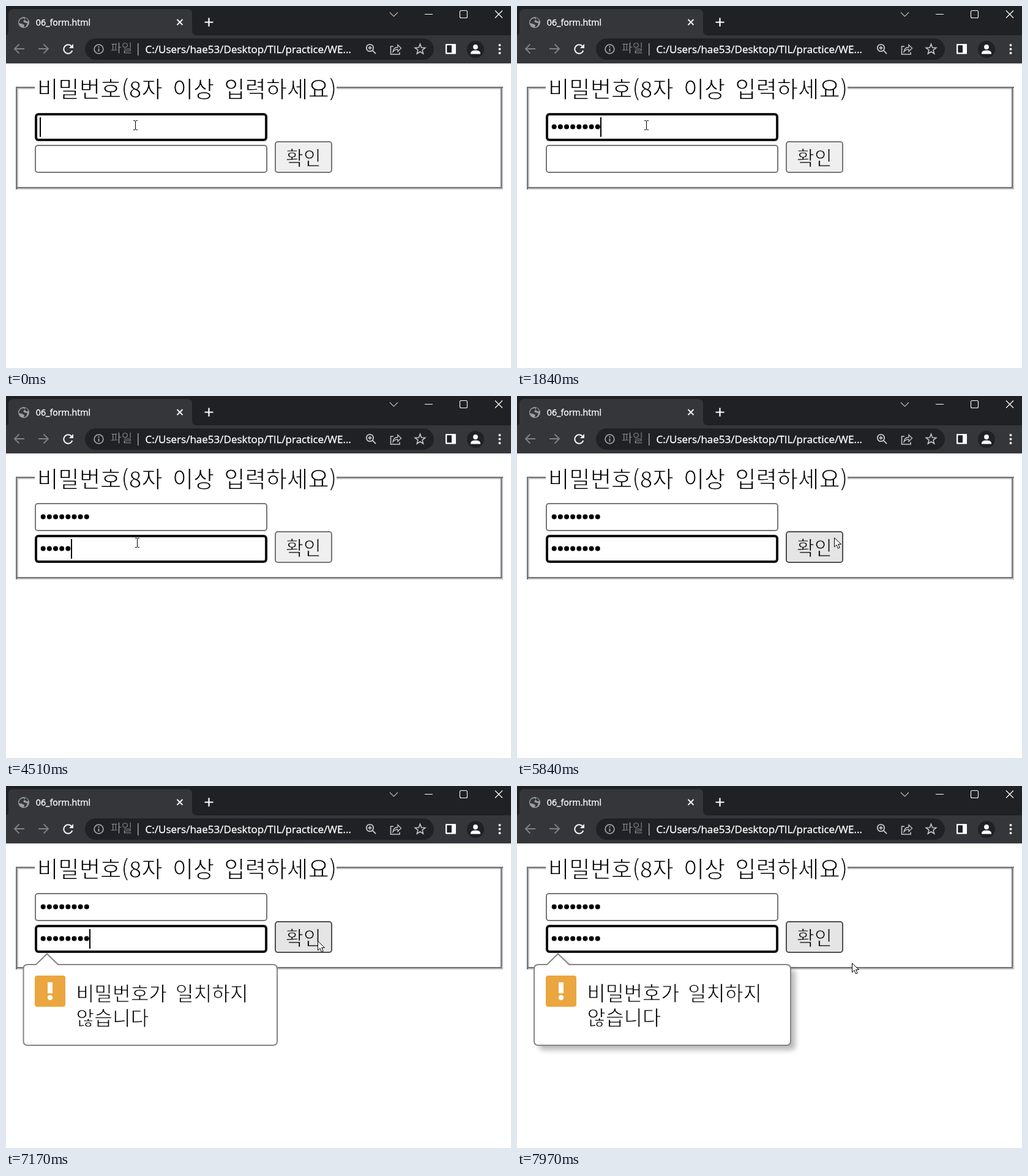
Write an HTML page with a canvas that moves like this. It is 825x592 px and loops after 8 s.

```html
<!DOCTYPE html>
<html lang="ko">
<head>
<meta charset="utf-8">
<style>
html, body { margin: 0; width: 100%; height: 100%; overflow: hidden; background: #fff; }
canvas { display: block; }
</style>
</head>
<body>
<canvas id="stage" width="825" height="592"></canvas>
<script>
const ctx = document.getElementById('stage').getContext('2d');
const LOOP = 8000;
const HANGUL = '"Noto Sans CJK KR", "Noto Sans CJK", sans-serif';
const LATIN = '"Open Sans", "Noto Sans", sans-serif';
const BAR = '#202124', TOOLBAR = '#35363a', GREY = '#9aa0a6', LIGHT = '#f1f3f4';

// Each track is a list of [start, value]; the latest started value holds.
const firstTyped = [[0, 0], [260, 1], [520, 2], [790, 3], [1050, 4], [1310, 6], [1590, 7], [1840, 8]];
const secondTyped = [[0, 0], [3440, 1], [3720, 2], [3970, 3], [4250, 4], [4510, 5], [4780, 6], [5040, 7], [5290, 8]];
const focus = [[0, 1], [2910, 2], [6910, 0], [7170, 2]];
const caretOn = [[0, true], [2370, false], [2910, true], [5840, false], [6370, true], [7700, false]];
const button = [[0, 'idle'], [5840, 'hover'], [6910, 'down'], [7170, 'hover']];
const pointer = [
  [0, ['beam', 211, 195]], [2110, ['beam', 212, 207]], [2370, ['arrow', 206, 225]],
  [2640, ['beam', 214, 240]], [5290, ['arrow', 285, 279]], [5570, ['beam', 421, 266]],
  [5840, ['arrow', 518, 231]], [6110, ['arrow', 515, 243]], [6370, ['arrow', 512, 253]],
  [6640, ['arrow', 509, 253]], [7970, ['arrow', 547, 289]]
];
const bubble = [
  [0, null],
  [7170, { left: 28.5, right: 443, size: 32.3, shadow: false }],
  [7440, { left: 28.5, right: 443, size: 32.3, shadow: true }],
  [7700, { left: 28, right: 447, size: 32.8, shadow: true }]
];
const buttonLook = {
  idle: ['#efefef', '#767676'],
  hover: ['#e5e5e5', '#4f4f4f'],
  down: ['#f5f5f5', '#8d8d8d']
};

function at(track, t) {
  let value;
  for (const [start, v] of track) if (t >= start) value = v;
  return value;
}

function rect(x, y, w, h, color) {
  ctx.fillStyle = color;
  ctx.fillRect(x, y, w, h);
}

function round(x, y, w, h, r, color) {
  ctx.beginPath();
  ctx.roundRect(x, y, w, h, r);
  ctx.fillStyle = color;
  ctx.fill();
}

function framed(x, y, w, h, r, border, fill, line = 2) {
  round(x, y, w, h, r, border);
  round(x + line, y + line, w - 2 * line, h - 2 * line, Math.max(r - line, 1), fill);
}

function dot(x, y, r, color) {
  ctx.beginPath();
  ctx.arc(x, y, r, 0, Math.PI * 2);
  ctx.fillStyle = color;
  ctx.fill();
}

function ring(x, y, r, color, line, from = 0, to = Math.PI * 2) {
  ctx.beginPath();
  ctx.arc(x, y, r, from, to);
  ctx.strokeStyle = color;
  ctx.lineWidth = line;
  ctx.stroke();
}

function stroke(path, color, line) {
  ctx.strokeStyle = color;
  ctx.lineWidth = line;
  ctx.stroke(new Path2D(path));
}

function fill(path, color) {
  ctx.fillStyle = color;
  ctx.fill(new Path2D(path));
}

function text(str, x, y, font, color, edge, line) {
  ctx.font = font;
  ctx.fillStyle = color;
  ctx.fillText(str, x, y);
  ctx.strokeStyle = edge;
  ctx.lineWidth = line;
  ctx.lineJoin = 'round';
  ctx.strokeText(str, x, y);
  ctx.lineJoin = 'miter';
}

// An edge in the background colour thins the strokes to a light weight.
function hangul(str, x, y, size, color, background) {
  ctx.wordSpacing = size * 0.2 + 'px';
  text(str, x, y, `300 ${size}px ${HANGUL}`, color, background, size * 0.026);
  ctx.wordSpacing = '0px';
}

function latin(str, x, y, size) {
  text(str, x, y, `${size}px ${LATIN}`, '#fff', '#fff', 0.35);
}

function drawTabs() {
  rect(0, 0, 825, 48, BAR);
  fill('M0 48Q4 48 4 40V13Q4 5 12 5H296Q304 5 304 13V40Q304 48 312 48Z', TOOLBAR);
  dot(29, 27, 9, GREY);
  fill('M22 24Q24 20 29 20L31 22L28 25L30 27L35 28L33 33L29 35L30 31L26 29L21 28Z', TOOLBAR);
  fill('M31 19Q36 21 36 25L33 25L31 23Z', TOOLBAR);
  latin('06_form.html', 48.8, 32, 14.2);
  stroke('M279.5 22L288.5 31M288.5 22L279.5 31', LIGHT, 2);
  stroke('M324.5 26.5H338.5M331.5 19.5V33.5', '#fff', 2.2);
  stroke('M627 10.5L633.5 17L640 10.5', '#bbb', 1.1);
  stroke('M684 13.5H697', '#fff', 1);
  ctx.beginPath();
  ctx.roundRect(741.5, 7.5, 12, 12, 2);
  ctx.strokeStyle = '#fff';
  ctx.lineWidth = 1.1;
  ctx.stroke();
  stroke('M799 7.5L811 19.5M811 7.5L799 19.5', '#fff', 1.2);
}

function drawToolbar() {
  rect(0, 48, 825, 45, TOOLBAR);
  rect(0, 93, 825, 1, '#494a4d');
  stroke('M30 70H14.5M21.5 62.5L14 70L21.5 77.5M53 70H68.5M61.5 62.5L69 70L61.5 77.5', '#808185', 1.9);
  ring(101.5, 70.5, 7.2, LIGHT, 2.1, 0.35, 5.5);
  fill('M110 62V69H103Z', LIGHT);

  round(129, 53, 570, 35, 17.5, BAR);
  ring(151.5, 70.5, 7.4, GREY, 1.8);
  rect(150.5, 69.5, 2, 5, GREY);
  rect(150.5, 66, 2, 2, GREY);
  hangul('파일', 171, 76, 19.2, GREY, BAR);
  rect(215, 61, 1.5, 20, GREY);
  latin('C:/Users/hae53/Desktop/TIL/practice/WE...', 227.6, 77, 17);

  const icon = '#c4c7ca';
  ring(594.5, 68.5, 5.7, icon, 1.8);
  stroke('M598.7 72.7L604 78M591.5 68.5H597.5M594.5 65.5V71.5', icon, 1.8);
  stroke('M633 66H628.5V79H643V75.5', icon, 1.6);
  stroke('M632 75Q633 67.5 640 67.5V63.5L645.5 69L640 74.5V70.8Q635 70.8 632 75Z', icon, 1.3);
  drawStar(676.5, 71, 8.7, icon);

  framed(718, 62, 17, 16.5, 1, '#fff', BAR, 2.3);
  rect(728, 63, 6, 14, '#fff');
  dot(767, 71, 14, BAR);
  dot(767, 67, 3.9, '#fff');
  fill('M759 78.5V76.5Q760 72.5 767 72.5Q774 72.5 775 76.5V78.5Z', '#fff');
  for (const y of [64, 70.5, 77]) dot(806.5, y, 2, LIGHT);
}

function drawStar(x, y, size, color) {
  ctx.beginPath();
  for (let i = 0; i < 10; i++) {
    const r = i % 2 ? size * 0.43 : size;
    const a = i * Math.PI / 5 - Math.PI / 2;
    ctx.lineTo(x + r * Math.cos(a), y + r * Math.sin(a));
  }
  ctx.closePath();
  ctx.strokeStyle = color;
  ctx.lineWidth = 1.6;
  ctx.stroke();
}

function drawFieldset() {
  const dark = '#727272', pale = '#c0c0c0';
  rect(16, 132, 796, 168, pale);
  rect(16, 132, 796, 2, dark);
  rect(16, 132, 2, 168, dark);
  rect(18, 296, 792, 2, dark);
  rect(808, 134, 2, 164, dark);
  rect(20, 136, 788, 160, '#fff');
  rect(18, 298, 794, 2, pale);
  rect(47, 131, 493, 6, '#fff');
  hangul('비밀번호(8자 이상 입력하세요)', 51, 150, 37.3, '#000', '#fff');
}

function drawInput(y, count, focused, hovered, caret) {
  if (focused) framed(47, y, 380, 46, 6, '#101010', '#fff', 4);
  else framed(47, y, 380, 46, 5, hovered ? '#4f4f4f' : '#767676', '#fff');
  for (let i = 0; i < count; i++) dot(60.7 + i * 10.15, y + 22.5, 4, '#000');
  if (focused && caret) rect(55 + Math.round(count * 10.15), y + 7, 2, 32, '#000');
}

function drawButton(state) {
  const [face, border] = buttonLook[state];
  framed(439, 221, 94, 52, 5, border, face);
  hangul('확인', 457, 260, 31.4, '#000', face);
}

function drawBubble({ left, right, size, shadow }) {
  const outline = new Path2D(
    `M${left + 7} 292H49L67 274.5L85 292H${right - 7}Q${right} 292 ${right} 299V417` +
    `Q${right} 424 ${right - 7} 424H${left + 7}Q${left} 424 ${left} 417V299Q${left} 292 ${left + 7} 292Z`);
  ctx.save();
  if (shadow) {
    ctx.shadowColor = 'rgba(0,0,0,.27)';
    ctx.shadowOffsetX = ctx.shadowOffsetY = 8;
    ctx.shadowBlur = 8;
  }
  ctx.fillStyle = '#fff';
  ctx.fill(outline);
  ctx.restore();
  ctx.strokeStyle = '#858585';
  ctx.lineWidth = 2;
  ctx.stroke(outline);

  round(47, 310, 50, 51, 4, '#eba63f');
  rect(68, 321, 8, 18, '#fff');
  dot(72, 346, 4.2, '#fff');
  hangul('비밀번호가 일치하지', 114.5, 351, size, '#000', '#fff');
  hangul('않습니다', 114.5, 391, size, '#000', '#fff');
}

function drawPointer([kind, x, y]) {
  ctx.save();
  ctx.translate(x, y);
  if (kind === 'beam') {
    stroke('M-3 -7.5H0M1 -7.5H4M.5 -7V7M-3 7.5H0M1 7.5H4', '#000', 1);
  } else {
    const arrow = 'M.5 .8V15.8L4 12.4L6.5 18.2L9.2 17L6.7 11.4H11.5Z';
    fill(arrow, '#fff');
    stroke(arrow, '#000', 1);
  }
  ctx.restore();
}

function draw(t) {
  rect(0, 0, 825, 592, '#fff');
  drawTabs();
  drawToolbar();
  drawFieldset();

  const focused = at(focus, t), caret = at(caretOn, t);
  const press = at(button, t), note = at(bubble, t);
  drawInput(175, at(firstTyped, t), focused === 1, false, caret);
  drawInput(227, at(secondTyped, t), focused === 2, t >= 2640 && t < 2910, caret);
  drawButton(press);
  if (note) drawBubble(note);
  if (press === 'down') dot(508.5, 253.5, 15.5, 'rgba(255,245,40,.65)');
  drawPointer(at(pointer, t));
}

const begin = performance.now();
function tick() {
  draw((performance.now() - begin) % LOOP);
  requestAnimationFrame(tick);
}
tick();
</script>
</body>
</html>
```
